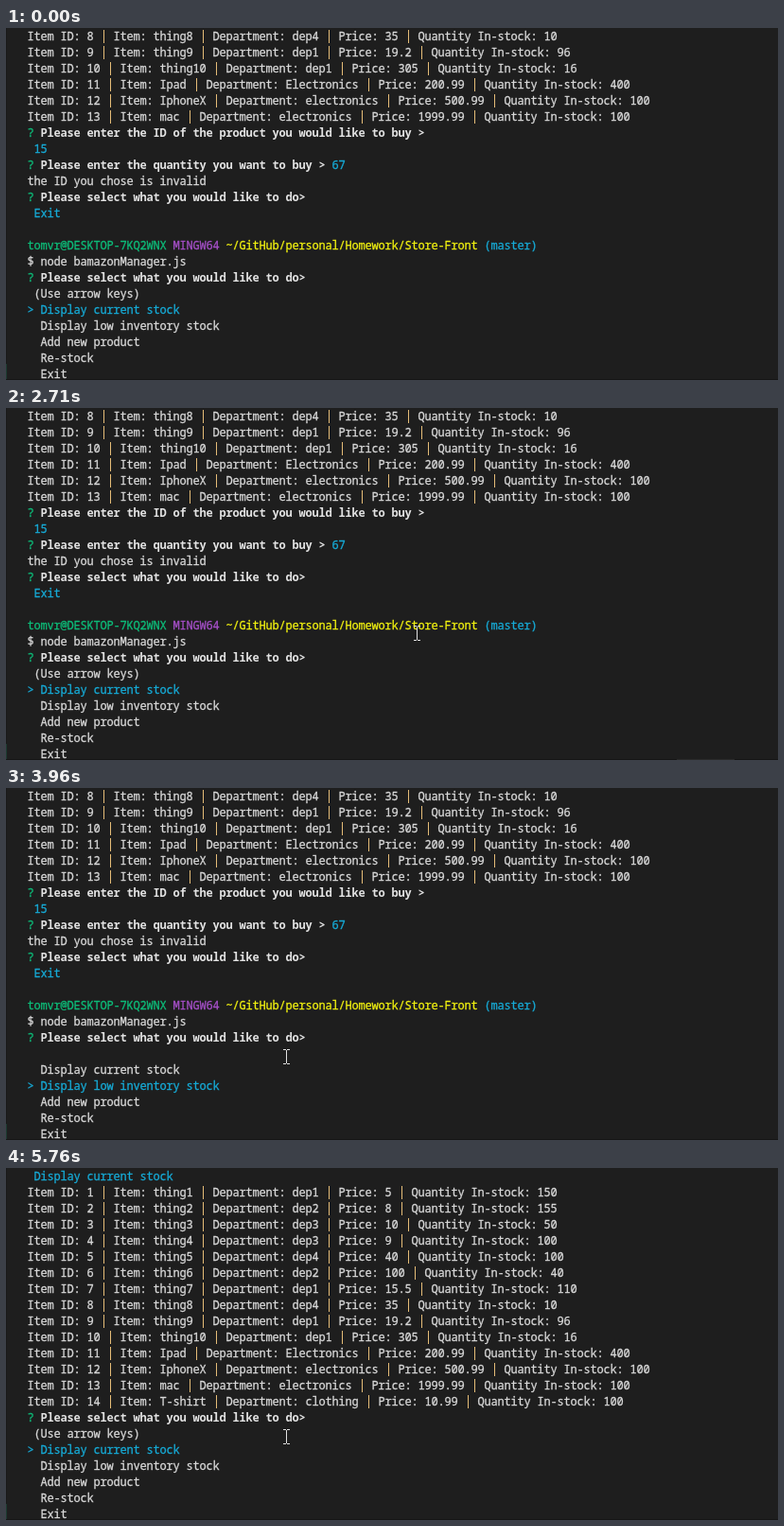
These frames come from a looping animation (816 by 372 pixels, 8000 ms). An HTML page with a canvas:

```html
<!DOCTYPE html>
<html lang="en">
<head>
<meta charset="utf-8">
<title>Store terminal</title>
<style>
html, body { margin: 0; width: 100%; height: 100%; overflow: hidden; background: #1e1e1e; }
canvas { display: block; }
</style>
</head>
<body>
<canvas id="stage" width="816" height="372"></canvas>
<script>
const ctx = document.getElementById('stage').getContext('2d');
const LOOP = 8000, LEFT = 22, CELL = 7, LINE = 17, BASE = 13;
const FONT = '12px "Noto Sans Mono", "DejaVu Sans Mono", monospace';
const color = {
  back: '#1e1e1e', text: '#d8d8d8', bar: '#e6bd78', bold: '#e2e2e2',
  green: '#0dbc79', cyan: '#16aad6', purple: '#a44fc6', yellow: '#f0f010'
};

// A line is a list of [text, colour, bold] segments.
const plain = text => [[text, color.text]];
const answer = text => [[' ' + text, color.cyan]];
const question = (text, reply = '') =>
  [['? ', color.green], [text, color.bold, true], [reply, color.cyan]];

const stock = [
  'thing1 dep1 5 150', 'thing2 dep2 8 155', 'thing3 dep3 10 50',
  'thing4 dep3 9 100', 'thing5 dep4 40 100', 'thing6 dep2 100 40',
  'thing7 dep1 15.5 110', 'thing8 dep4 35 10', 'thing9 dep1 19.2 96',
  'thing10 dep1 305 16', 'Ipad Electronics 200.99 400',
  'IphoneX electronics 500.99 100', 'mac electronics 1999.99 100',
  'T-shirt clothing 10.99 100'
].map((row, i) => {
  const [item, dep, price, count] = row.split(' ');
  return plain(`Item ID: ${i + 1} | Item: ${item} | Department: ${dep} | Price: ${price} | Quantity In-stock: ${count}`);
});

const ask = question('Please select what you would like to do>');
const options = ['Display current stock', 'Display low inventory stock', 'Add new product', 'Re-stock', 'Exit'];

const menu = (selected, hint) => [
  plain(hint ? ' (Use arrow keys)' : ''),
  ...options.map((name, i) => i === selected
    ? [['> ' + name, color.cyan]] : plain('  ' + name))
];

const session = [
  ...stock.slice(7, 13),
  question('Please enter the ID of the product you would like to buy >'),
  answer('15'),
  question('Please enter the quantity you want to buy >', ' 67'),
  plain('the ID you chose is invalid'),
  ask,
  answer('Exit'),
  [],
  [['tomvr@DESKTOP-7KQ2WNX ', color.green], ['MINGW64 ', color.purple],
   ['~/GitHub/personal/Homework/Store-Front ', color.yellow], ['(master)', color.cyan]],
  plain('$ node bamazonManager.js'),
  ask
];

const screens = [
  [0, [...session, ...menu(0, true)]],
  [3960, [...session, ...menu(1, false)]],
  [4280, [...session, ...menu(0, false)]],
  [5670, [...session, answer(options[0])]],
  [5760, [answer(options[0]), ...stock, ask, ...menu(0, true)]]
];

// Pointer stops: start time, centre x, centre y
const pointer = [
  [300, 529, 241], [370, 493, 221], [450, 476, 209],
  [2710, 434, 238], [2790, 372, 261], [2870, 318, 278], [2940, 296, 284],
  [3260, 285, 279], [3350, 296, 284]
];

const current = (steps, t) => steps.filter(step => step[0] <= t).pop();

function rect(fill, x, y, w, h) {
  ctx.fillStyle = fill;
  ctx.fillRect(x, y, w, h);
}

// Each character sits in its own terminal cell.
function drawChar(char, fill, x, y, bold) {
  if (char === '|') return rect(color.bar, x + 4, y - 11, 1, 14);
  ctx.fillStyle = ctx.strokeStyle = fill;
  ctx.fillText(char, x + 4, y);
  if (!bold) ctx.strokeText(char, x + 4, y);
}

function drawLine(segments, row) {
  let x = LEFT;
  for (const [text, fill, bold] of segments) {
    ctx.font = (bold ? 'bold ' : '') + FONT;
    for (const char of text) {
      drawChar(char, fill, x, BASE + row * LINE, bold);
      x += CELL;
    }
  }
}

function drawPointer([, x, y]) {
  for (const edge of [y - 8, y + 7]) {
    rect('#e1e1e1', x - 3, edge, 3, 1);
    rect('#e1e1e1', x + 1, edge, 3, 1);
  }
  rect('#e1e1e1', x, y - 7, 1, 14);
}

function draw(t) {
  rect(color.back, 0, 0, 816, 372);
  rect('#191919', 0, 0, 1, 372);
  rect('#1c3a30', 0, 355, 1, 16);
  rect('#161616', 0, 371, 816, 1);
  if (t >= 1630 && t < 3260) rect('#2a2a2a', 709, 371, 61, 1);
  current(screens, t)[1].forEach(drawLine);
  if (t >= 5670 && t < 5760) rect('#cccccc', LEFT, 17 * LINE, CELL, LINE);
  const place = current(pointer, t);
  if (place) drawPointer(place);
}

ctx.textAlign = 'center';
ctx.lineWidth = 0.3;
let start;
function tick(now) {
  start ??= now;
  draw((now - start) % LOOP);
  requestAnimationFrame(tick);
}
requestAnimationFrame(tick);
</script>
</body>
</html>
```
